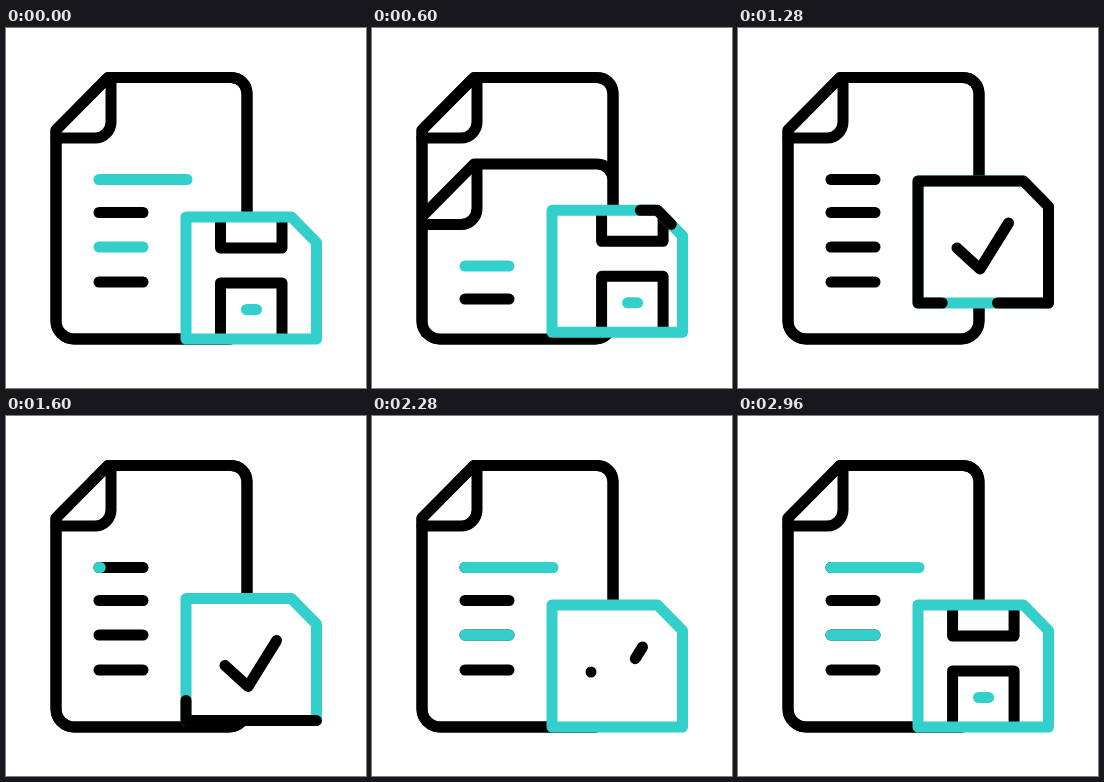
An HTML page that plays this animation: 360x360 px, repeating every 3 s.

```html
<!DOCTYPE html>
<html lang="en">
<head>
<meta charset="utf-8">
<title>Save file</title>
<style>
  html, body { margin: 0; width: 100%; height: 100%; overflow: hidden; background: #fff; }
  svg { display: block; width: 100vw; height: 100vh; }
  .ink, .teal { fill: none; stroke: #000; stroke-width: 11; stroke-linecap: round; stroke-linejoin: round; }
  .teal { stroke: #32cfcb; }
  .paper { fill: #fff; }
</style>
</head>
<body>
<svg viewBox="0 0 360 360">
  <defs>
    <path id="page" d="M102 49.5H225A16 16 0 0 1 241 65.500V293A18 18 0 0 1 223 311H68A18 18 0 0 1 50 293V102Z"/>
    <path id="fold" d="M105 50V94A16 16 0 0 1 89 110H50"/>
    <path id="case" d="M180 189H285.500L310.500 214.500V311H180Z"/>
    <clipPath id="inPage"><use href="#page"/></clipPath>
    <clipPath id="inCase"><use href="#case"/></clipPath>
    <clipPath id="aboveEdge"><rect width="360" height="299"/></clipPath>
  </defs>

  <g class="ink">
    <use href="#page" class="paper"/>
    <use href="#fold"/>
    <g id="lines"></g>
  </g>
  <g id="old" clip-path="url(#inPage)">
    <g id="sheet" class="ink">
      <use href="#page" class="paper"/>
      <use href="#fold"/>
    </g>
    <g clip-path="url(#aboveEdge)">
      <g id="oldLines">
        <path id="oldTop" class="teal"/>
        <path class="ink" d="M93 184.500H137"/>
        <path class="teal" d="M93 219H137"/>
        <path class="ink" d="M93 254H137"/>
      </g>
    </g>
  </g>
  <use href="#page" class="ink"/>

  <g id="disk">
    <use href="#case" fill="#fff"/>
    <g clip-path="url(#inCase)">
      <g id="parts">
        <path class="ink" d="M214.500 189V220H276V189M214.500 311V255H276V311"/>
        <path class="teal" d="M240.500 281.500H250.500"/>
      </g>
    </g>
    <path id="check" class="ink" d="M219 256L242 277L270.500 231"/>
    <use href="#case" class="teal"/>
    <use href="#case" id="runner" class="ink"/>
  </g>
</svg>
<script>
  const LOOP = 3000;
  const $ = id => document.getElementById(id);
  const rows = [151.5, 184.5, 219, 254];

  // Progress 0..1 with soft start and stop
  const ease = (t, start, length) => {
    const x = Math.min(1, Math.max(0, (t - start) / length));
    return x * x * (3 - 2 * x);
  };

  const addLine = (cls, y, end) => {
    const path = document.createElementNS('http://www.w3.org/2000/svg', 'path');
    path.setAttribute('class', cls);
    path.setAttribute('d', `M93 ${y}H${end}`);
    $('lines').append(path);
    return path;
  };
  const blackLines = rows.map(y => addLine('ink', y, 137));
  const tealLines = [addLine('teal', rows[0], 181), addLine('teal', rows[2], 137)];

  const show = (el, on) => { el.style.display = on ? '' : 'none'; };
  const move = (el, x, y) => el.setAttribute('transform', `translate(${x} ${y})`);

  // Show only the stretch from a to b of a path of the given length
  const trim = (el, a, b, length) => {
    const part = b - a;
    show(el, part > 0.01);
    el.style.strokeDasharray = `${part} ${length - part + (a < 0.01 ? 20 : 0)}`;
    el.style.strokeDashoffset = -a;
  };

  const caseLen = $('case').getTotalLength();
  const checkLen = $('check').getTotalLength();

  function draw(t) {
    // Used sheet drops out, fresh lines are written, then coloured
    const drop = 262 * ease(t, 370, 600);
    const fresh = t >= 970 && t < LOOP;
    show($('old'), !fresh);
    move($('sheet'), 0, drop);
    move($('oldLines'), 0, drop);
    $('oldTop').setAttribute('d', `M93 ${rows[0]}H${181 - 44 * ease(t, 300, 300)}`);
    blackLines.forEach((el, i) => {
      const len = 44;
      trim(el, 0, len * ease(t, 658 + 20 * i, 360), len);
    });
    trim(tealLines[0], 0, 88 * ease(t, 1570, 440), 88);
    trim(tealLines[1], 0, 44 * ease(t, 1650, 440), 44);

    // Disk lifts and returns while its parts slide aside
    move($('disk'), 0, -36 * (ease(t, 480, 440) - ease(t, 1280, 440)));
    move($('parts'), 110 * (ease(t, 480, 520) - ease(t, 2380, 590)), 0);
    trim($('check'), checkLen * ease(t, 1990, 390), checkLen * ease(t, 800, 390), checkLen);

    // Black stroke chases around the case
    const turn = 88 + 0.3 * (t - 600);
    const tail = turn + caseLen * ease(t, 1131, 744);
    const head = turn + caseLen * ease(t, 455, 870);
    const part = head - tail;
    const runner = $('runner');
    show(runner, part > 0.5);
    runner.style.strokeDasharray = `${part} ${caseLen - part}`;
    runner.style.strokeDashoffset = -tail;
  }

  function frame() {
    draw(performance.now() % LOOP);
    requestAnimationFrame(frame);
  }
  frame();
</script>
</body>
</html>
```
